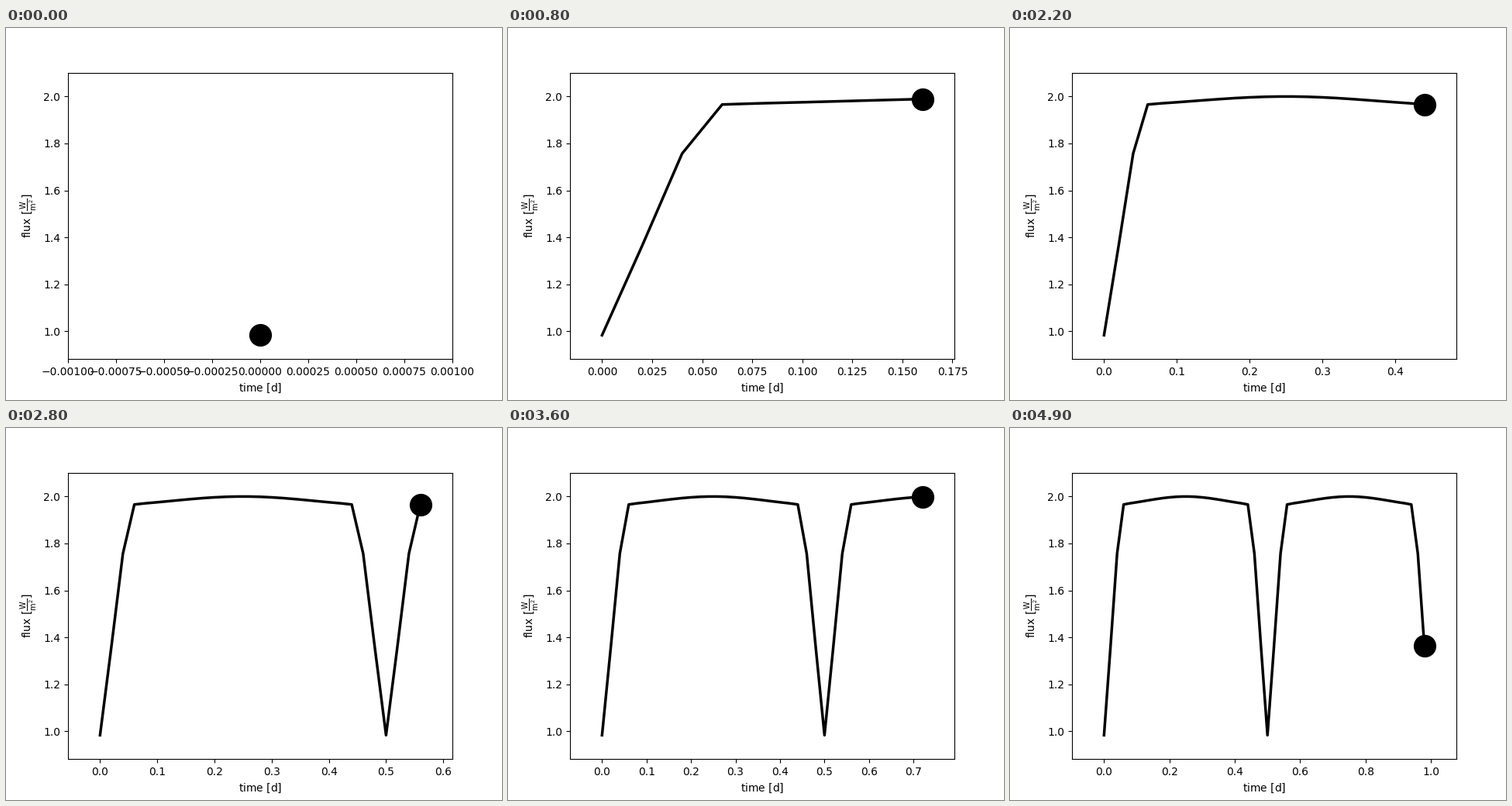
Recreate the animation shown at these times as a matplotlib script. Size 640 by 480 pixels, loop 5 s.

```python
import numpy as np
import matplotlib.pyplot as plt
from matplotlib.animation import FuncAnimation

FRAMES = 50
STEP = 0.02  # days per frame
HALF_PERIOD = 0.5

# Flux during eclipse, by steps away from mid-eclipse
ECLIPSE = {0: 0.983, 1: 1.3635, 2: 1.757, 3: 1.966}


def flux_at(i):
    """Ellipsoidal variation with two equal eclipses per orbit."""
    steps = round(HALF_PERIOD / STEP)
    distance = min(i % steps, -i % steps)
    if distance in ECLIPSE:
        return ECLIPSE[distance]
    return 2 - 0.0375 * np.cos(2 * np.pi * i * STEP) ** 2


times = np.arange(FRAMES) * STEP
flux = np.array([flux_at(i) for i in range(FRAMES)])

plt.rcParams["font.family"] = "DejaVu Sans"
fig, ax = plt.subplots(figsize=(6.4, 4.8), dpi=100)
curve, = ax.plot([], [], "k-", lw=2.5)
marker, = ax.plot([], [], "ko", ms=20)
ax.set_xlabel(r"time [$\mathrm{d}$]")
ax.set_ylabel(r"flux [$\mathrm{\frac{W}{m^{2}}}$]")
pad = 0.1 * np.ptp(flux)
ax.set_ylim(flux.min() - pad, 2 + pad)


def update(i):
    now = times[i]
    curve.set_data(times[:i + 1], flux[:i + 1])
    marker.set_data([now], [flux[i]])
    if i == 0:
        ax.set_xlim(-0.001, 0.001)
    else:
        ax.set_xlim(-0.1 * now, 1.1 * now)
    return curve, marker


anim = FuncAnimation(fig, update, frames=FRAMES, interval=100, repeat=True,
                     repeat_delay=0, blit=False)
plt.show()
```
